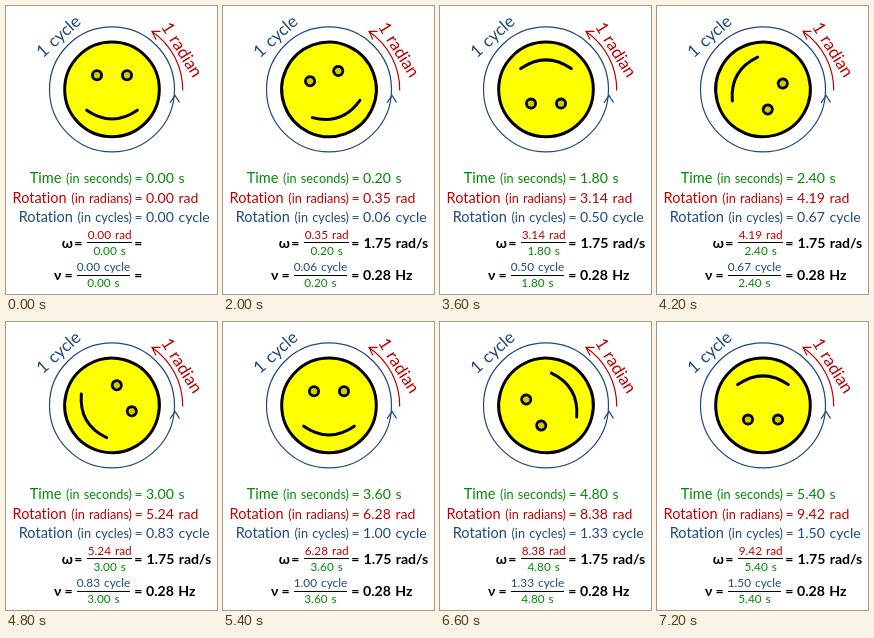
Recreate the animation shown at these times as an HTML page. Size 211 by 288 pixels, loop 7.9 s.

```html
<!DOCTYPE html>
<html lang="en">
<head>
<meta charset="utf-8">
<title>Angular velocity and frequency</title>
<style>
  html, body { margin: 0; width: 100%; height: 100%; overflow: hidden; background: #fff; }
  svg { display: block; }
  text {
    font: 14.1px Lato, "Open Sans", "Noto Sans", sans-serif;
    font-variant-ligatures: none;
    word-spacing: 1px;
  }
  .name { font-size: 14.5px; text-anchor: end; }
  .unit { font-size: 12.7px; }
  .frac { font-size: 11.8px; text-anchor: middle; }
  .arc { font-size: 17px; text-anchor: middle; }
  .bold { font-weight: bold; }
  .green { fill: #008a00; }
  .red { fill: #c00000; }
  .blue { fill: #1f497d; }
  .line { fill: none; stroke: #000; stroke-width: 1.2; }
  .line.red { fill: none; stroke: #c00000; }
  .line.blue { fill: none; stroke: #1f497d; }
  .bar { stroke: #000; }
</style>
</head>
<body>
<svg width="211" height="288" viewBox="0 0 211 288">
  <g transform="translate(106 83.4)">
    <circle class="line blue" r="62.5"/>
    <path class="line blue" d="M58 13.5L63 6L67.5 13"/>
    <path class="line red" d="M70.7 1A70.7 70.7 0 0 0 40 -58M48.5 -58L40 -58L44 -50"/>
    <g id="face" stroke="#000" stroke-width="3" stroke-linecap="round">
      <circle r="47.3" fill="#ff0"/>
      <circle cx="-15" cy="-14.2" r="4.6" fill="#cc0" stroke-width="2.8"/>
      <circle cx="15" cy="-14.2" r="4.6" fill="#cc0" stroke-width="2.8"/>
      <path d="M-25.3 20.8Q0 38.3 25.3 20.8" fill="none"/>
    </g>
  </g>
  <text class="arc blue" transform="translate(53 31) rotate(-42)" y="5">1 cycle</text>
  <text class="arc red" transform="translate(175.2 44) rotate(58)" y="5">1 radian</text>

  <g class="green">
    <text class="name" x="126" y="177.3">Time <tspan class="unit">(in seconds)</tspan></text>
    <text x="128.6" y="177.3">=</text>
    <text x="140" y="177.3" data-value="time"></text>
  </g>
  <g class="red">
    <text class="name" x="126" y="196.5">Rotation <tspan class="unit">(in radians)</tspan></text>
    <text x="128.6" y="196.5">=</text>
    <text x="140" y="196.5" data-value="radians"></text>
  </g>
  <g class="blue">
    <text class="name" x="126" y="215.7">Rotation <tspan class="unit">(in cycles)</tspan></text>
    <text x="128.6" y="215.7">=</text>
    <text x="140" y="215.7" data-value="cycles"></text>
  </g>

  <text class="bold" x="55.7" y="242.3">ω</text>
  <text class="bold" x="68.3" y="242.3">=</text>
  <text class="frac red" x="103.7" y="233" data-value="radians"></text>
  <path class="bar" d="M81 236.5H126"/>
  <text class="frac green" x="103.7" y="248.5" data-value="time"></text>
  <text class="bold" x="128.3" y="242.3">=</text>
  <text class="bold" x="140.5" y="242.3" data-value="omega"></text>

  <text class="bold" x="48" y="273.5">ν</text>
  <text class="bold" x="58.5" y="273.5">=</text>
  <text class="frac blue" x="97.5" y="265.2" data-value="cycles"></text>
  <path class="bar" d="M71 269.5H124"/>
  <text class="frac green" x="97.5" y="281" data-value="time"></text>
  <text class="bold" x="128.3" y="273.5">=</text>
  <text class="bold" x="140" y="273.5" data-value="nu"></text>
</svg>
<script>
  const LOOP = 7900, HOLD = 2000, TICK = 200, LAST_STEP = 27, DEGREES = 20;
  const face = document.getElementById('face');
  const fields = document.querySelectorAll('[data-value]');
  let shown = -1;

  function draw(step) {
    const cycles = step * DEGREES / 360;
    const values = {
      time: (step * TICK / 1000).toFixed(2) + ' s',
      radians: (cycles * 2 * Math.PI).toFixed(2) + ' rad',
      cycles: cycles.toFixed(2) + ' cycle',
      omega: step ? '1.75 rad/s' : '',
      nu: step ? '0.28 Hz' : ''
    };
    face.setAttribute('transform', `rotate(${-step * DEGREES})`);
    for (const field of fields) field.textContent = values[field.dataset.value];
  }

  function tick() {
    const ms = performance.now() % LOOP;
    const step = ms < HOLD ? 0 : Math.min(LAST_STEP, Math.floor((ms - HOLD) / TICK) + 1);
    if (step !== shown) draw(shown = step);
    requestAnimationFrame(tick);
  }
  tick();
</script>
</body>
</html>
```
